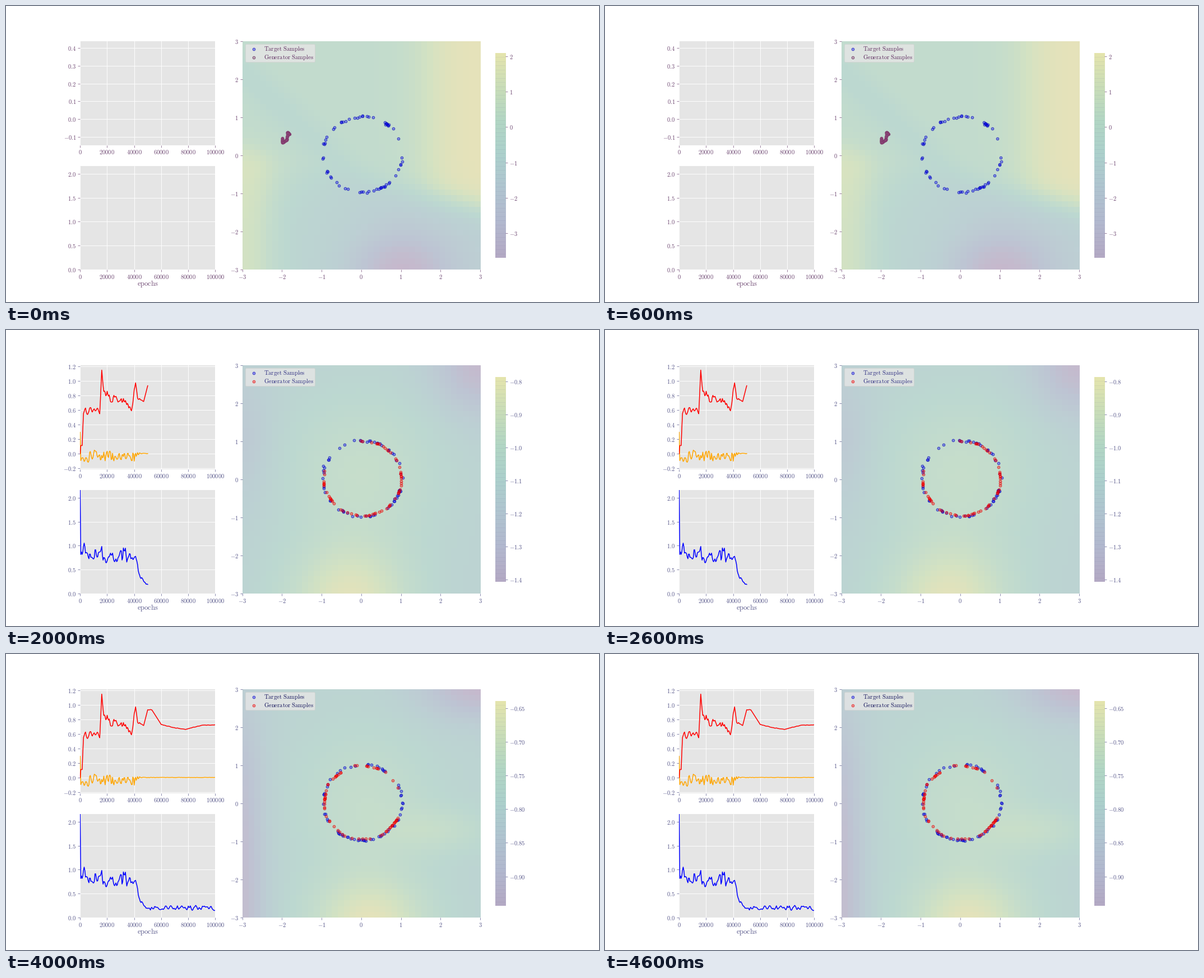
Animation of 1058 by 529 pixels, one loop 5 s. Source, as a matplotlib script:

```python
import numpy as np
import matplotlib as mpl
import matplotlib.pyplot as plt
from matplotlib.animation import FuncAnimation
from matplotlib.colors import LinearSegmentedColormap
from matplotlib.patches import FancyBboxPatch

W, H, DPI = 1058, 529, 64
PT = 72 / DPI  # points per pixel
EM = 10.6
SAMPLES = 64
mpl.rcParams["mathtext.fontset"] = "cm"

fig = plt.figure(figsize=(W / DPI, H / DPI), dpi=DPI, facecolor="white")


def panel(x, y, w, h):
    return fig.add_axes([x / W, 1 - (y + h) / H, w / W, h / H])


# three columns and two rows, the map spans two columns less its colour bar
LEFT, TOP, WIDE, TALL = .125 * W, .12 * H, .775 * W, .77 * H
COL, ROW = WIDE / 3.4, TALL / 2.2
MAP_X, MAP_W = LEFT + 1.2 * COL, .8 * 2.2 * COL
BAR_H = .9 * TALL

score_ax = panel(LEFT, TOP, COL, ROW)
loss_ax = panel(LEFT, TOP + 1.2 * ROW, COL, ROW)
map_ax = panel(MAP_X, TOP, MAP_W, TALL)
bar_ax = panel(MAP_X + 1.0625 * MAP_W, TOP + .05 * TALL, BAR_H / 20, BAR_H)
top_ax = panel(0, 0, W, H)


def shades(name, *rgb):
    return LinearSegmentedColormap.from_list(name, [np.array(c) / 255 for c in rgb])


MAP_COLORS = shades("map", (199, 183, 204), (190, 196, 211), (189, 207, 212),
                    (188, 216, 209), (197, 221, 204), (211, 226, 195), (230, 227, 186))
BAR_COLORS = shades("bar", (180, 169, 196), (178, 184, 206), (176, 196, 208),
                    (172, 208, 204), (178, 214, 196), (201, 221, 184), (229, 229, 173))


# ---- training curves ----
EPOCHS = 500 * np.arange(201)
K = EPOCHS / 1000


def jagged(seed, gap=.8):
    knots = np.arange(0, 101, gap)
    return np.interp(K, knots, np.random.default_rng(seed).uniform(-1, 1, knots.size))


def trend(*keys):
    return np.interp(K, *np.array(keys).T)


RED = trend((0, 0), (.5, .11), (1.5, .11), (2.5, .58), (8, .62), (14.5, .56), (16, 1.15),
            (17.5, .82), (25, .75), (38, .64), (41, .97), (42.5, .75), (47, .72),
            (50, .935), (53, .935), (60, .73), (70, .685), (78, .665), (90, .72), (100, .725))
RED += jagged(2) * trend((2, 0), (3, .08), (14, .06), (16, 0), (18, .07), (37, .09),
                         (41, .03), (48, .003))
GOLD = trend((0, .28), (.5, -.12), (2, -.04), (42, -.03), (45, 0))
GOLD += jagged(5) * trend((0, .02), (2, .09), (40, .09), (45, .006), (60, .002))
BLUE = trend((0, 2.17), (.5, .8), (3, .9), (15, .82), (41, .77), (44, .37), (50, .2))
BLUE += jagged(8) * trend((0, 0), (3, .22), (41, .17), (44, .05), (100, .06))


# ---- score surfaces, 0 = lowest and 1 = highest ----
def sig(t):
    return 1 / (1 + np.exp(-t))


def bump(x, y, cx, cy, sx, sy):
    return np.exp(-((x - cx) / sx) ** 2 - ((y - cy) / sy) ** 2)


def surface0(x, y):
    low = sig(-(y + .85 + .27 * (x - 1)) / .19)
    upper = .62 + .38 * sig((x - 1.6) / .33)
    upper -= .12 * np.exp(-((x + y + .8) / .6) ** 2) * sig(-3 * x)
    lower = .36 + .08 * sig(-2 * x) + .15 * bump(x, y, -2, 0, 1, 1)
    lower += .42 * sig((-2.3 - x) / .25) - .36 * bump(x, y, 1, -3.1, 1.3, 1.1)
    return upper * (1 - low) + lower * low


def surface1(x, y):
    return (.56 - .22 * sig((x - 1) / .5) + .46 * bump(x, y, -1.3, -3.3, 1.6, 1.4)
            + .12 * bump(x, y, -1, -.6, .9, 1.8) - .33 * bump(x, y, 3.1, 3, .9, 1.5))


def surface2(x, y):
    return (.4 + .28 * bump(x, y, 0, .2, 2, 2.1) + .55 * bump(x, y, -.3, -3.2, 1.6, 1.5)
            - .36 * bump(x, y, 3, 3, 1.2, 1.3) - .16 * bump(x, y, -3, 1, .8, 1.8))


def surface3(x, y):
    return (.42 + .25 * bump(x, y, .3, .2, 2, 2) + .56 * bump(x, y, -.4, -3.2, 1.4, 1.6)
            - .42 * bump(x, y, 3, 3, 1.3, 1.1) - .24 * bump(x, y, -3.1, -.4, .9, 1.5)
            + .06 * bump(x, y, 2.2, -1, 1.2, .8))


def surface4(x, y):
    return (.42 + .24 * bump(x, y, .1, 0, 1.7, 2) + .55 * bump(x, y, .2, -3.2, 1.5, 1.3)
            + .2 * bump(x, y, 2, -.7, 1.3, .6) - .4 * bump(x, y, 3, 3.1, 1.6, .9)
            - .36 * np.exp(-((x + 3.1) / .7) ** 2) * sig(2 - y))


CELL = -3 + 6 * (np.arange(40) + .5) / 40
GX, GY = np.meshgrid(CELL, CELL)


# ---- samples ----
def circle(deg, r=1.0):
    t = np.radians(deg)
    return np.c_[.03 + r * np.cos(t), .03 + r * np.sin(t)]


def real_samples(seed):
    rng = np.random.default_rng(seed)
    return circle(rng.uniform(0, 360, SAMPLES), 1 + rng.normal(0, .015, SAMPLES))


def along(path, u):
    at = np.arange(len(path))
    return np.c_[np.interp(u, at, path[:, 0]), np.interp(u, at, path[:, 1])]


def strand(*path):
    """Samples scattered along a bent line."""
    u = np.random.default_rng(1).uniform(0, len(path) - 1, SAMPLES)
    return along(np.array(path), u)


def loop(start, end, corners, seed):
    """Samples on an open ring, halfway between a polygon and a circle."""
    u = np.random.default_rng(seed).uniform(0, corners - 1, SAMPLES)
    flat = along(circle(np.linspace(start, end, corners)), u)
    return (flat + circle(start + (end - start) * u / (corners - 1))) / 2


# ---- one entry per step ----
def step(surface, fake, bar, ink, dark, paint, key, gold="#ffa500"):
    return dict(surface=surface, fake=fake, bar=bar, ink=ink, dark=dark,
                paint=paint, key=key, gold=gold)


PLUM, SLATE, NAVY = "#704a74", "#5a5a8c", "#12125a"
PINK = ((1, 0, 0, .36), (.9, 0, 0, .7))
REAL = ((0, 0, 1, .36), (0, 0, .7, .7))
STEPS = [
    step(surface0, strand((-1.99, .46), (-1.99, .34), (-1.88, .41), (-1.86, .61), (-1.81, .55)),
         (-3.696, 2.095, 1, 0), PLUM, "#5c2a5e",
         ((.55, .28, .47, .8), (.5, .22, .42, .8)), ((.6, .3, .5, .4), (.35, .15, .3, .8))),
    step(surface1, strand((-.3, .59), (-.08, .52), (.87, -.53), (.65, -.82)),
         (-1.604, -.054, .2, 1), "#6c5278", "#50285a",
         ((1, .22, .08, .75), (1, .03, 0, .9)), ((.87, .6, .26, .85), (.78, .5, .25, .9)),
         "#d6a85c"),
    step(surface2, loop(157, 460, 9, 2), (-1.407, -.786, .1, 1), SLATE, "#2c2c80", PINK, PINK),
    step(surface3, loop(152, -188, 7, 3), (-1.003, -.535, .1, 1), SLATE, NAVY, PINK,
         ((1, .3, .1, .5), (.8, .2, 0, .7))),
    step(surface4, loop(10, 340, 8, 4), (-.944, -.639, .05, 2), SLATE, NAVY, PINK, PINK),
]


def ticks(axis, first, last, gap, places):
    n = np.arange(np.ceil(first / gap - 1e-6), np.floor(last / gap + 1e-6) + 1)
    vals = np.round(gap * n, 6) + 0.0
    axis.set_ticks(vals, [f"${v:.{places}f}$" for v in vals])


def style(ax, ink, grid=False):
    ax.clear()
    ax.set_facecolor("#e5e5e5")
    for s in ax.spines.values():
        s.set_visible(False)
    ax.tick_params(length=3.8 * PT, pad=3 * PT, width=.7 * PT, color=ink,
                   labelcolor=ink, labelsize=EM * PT)
    if grid:
        ax.set_axisbelow(True)
        ax.grid(color="white", lw=.9 * PT)


def dots(ax, pts, paint):
    face, edge = paint
    x, y = np.atleast_2d(pts).T
    ax.scatter(x, y, s=(4.7 * PT) ** 2, facecolors=[face], edgecolors=[edge], lw=.9 * PT)


def label(x, y, words, color, size=EM, **kw):
    text = words.replace(" ", r"\ ")
    top_ax.text(x, y, rf"$\mathrm{{{text}}}$", color=color, fontsize=size * PT,
                va="baseline", **kw)


def draw_curves(i, s):
    score_range = (-.2155, 1.213, .2) if i else (-.1478, .438, .1)
    for ax, (low, high, gap) in ((score_ax, score_range), (loss_ax, (0, 2.17, .5))):
        style(ax, s["ink"], True)
        ax.set(xlim=(0, 1e5), ylim=(low, high))
        ticks(ax.xaxis, 0, 1e5, 20000, 0)
        ticks(ax.yaxis, low, high, gap, 1)
    n = 50 * i + 1
    if i:
        for ax, data, color in ((score_ax, GOLD, s["gold"]), (score_ax, RED, "#ff0000"),
                                (loss_ax, BLUE, "#0000ff")):
            ax.plot(EPOCHS[:n], data[:n], color=color, lw=1.5 * PT)


def draw_map(i, s):
    style(map_ax, s["ink"])
    map_ax.imshow(s["surface"](GX, GY), cmap=MAP_COLORS, vmin=0, vmax=1, origin="lower",
                  extent=(-3, 3, -3, 3), aspect="auto", interpolation="nearest")
    dots(map_ax, real_samples(10 + i), REAL)
    dots(map_ax, s["fake"], s["paint"])
    map_ax.set(xlim=(-3, 3), ylim=(-3, 3))
    ticks(map_ax.xaxis, -3, 3, 1, 0)
    ticks(map_ax.yaxis, -3, 3, 1, 0)


def draw_bar(s):
    low, high, gap, places = s["bar"]
    style(bar_ax, s["ink"])
    bar_ax.imshow(np.linspace(0, 1, 256)[:, None], cmap=BAR_COLORS, origin="lower",
                  extent=(0, 1, low, high), aspect="auto")
    bar_ax.hlines(np.linspace(low, high, 50)[1:-1], 0, 1, color="#606090",
                  lw=.5 * PT, alpha=.16)
    bar_ax.set(xlim=(0, 1), ylim=(low, high), xticks=[])
    bar_ax.yaxis.tick_right()
    ticks(bar_ax.yaxis, low, high, gap, places)


def draw_top(s):
    top_ax.clear()
    top_ax.set(xlim=(0, W), ylim=(H, 0))
    top_ax.axis("off")
    top_ax.add_patch(FancyBboxPatch((427.5, 68.5), 124, 32, fc=(.9, .9, .9, .8),
                                    ec="#d0d2d0", lw=.7 * PT,
                                    boxstyle="round,pad=0,rounding_size=2"))
    for y, words, paint in ((76.5, "Target Samples", REAL), (91.5, "Generator Samples", s["key"])):
        dots(top_ax, (441.5, y), paint)
        label(460, y + 3.8, words, s["dark"])
    label(253, 500, "epochs", s["ink"], 12.5, ha="center")


def draw(i):
    s = STEPS[i]
    draw_curves(i, s)
    draw_map(i, s)
    draw_bar(s)
    draw_top(s)
    return []


anim = FuncAnimation(fig, draw, frames=len(STEPS), init_func=lambda: draw(0),
                     interval=1000, repeat=True, repeat_delay=0, blit=False)
plt.show()
```
